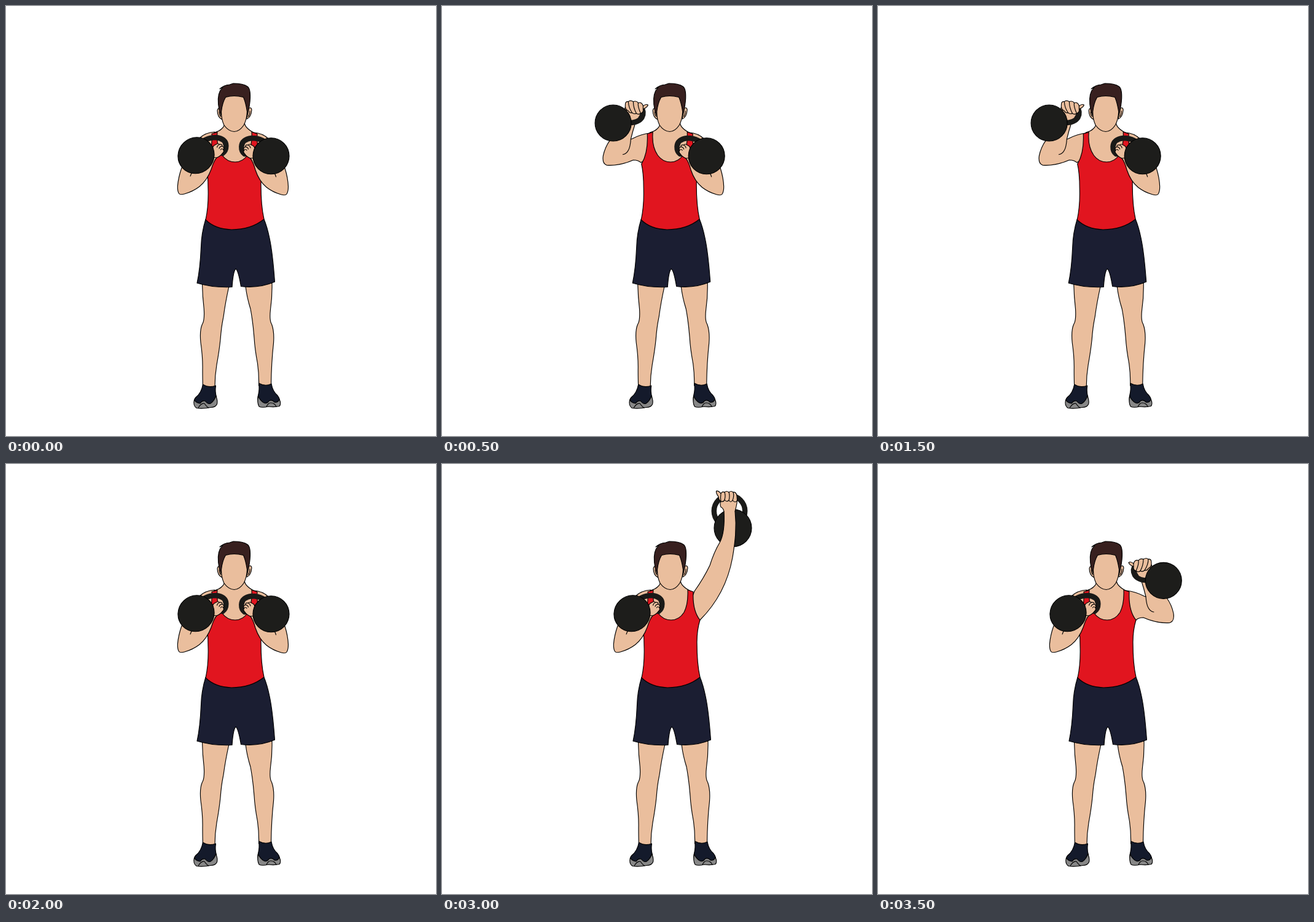
These frames come from a looping animation (700x700 px, 4 s). An HTML page:

```html
<!DOCTYPE html>
<html lang="en">
<head>
<meta charset="utf-8">
<title>Kettlebell press</title>
<style>
  html, body { margin: 0; width: 100%; height: 100%; overflow: hidden; background: #fff; }
  svg { display: block; width: 100vw; height: 100vh; }
  .skin { fill: #eabe9d; }
  .red { fill: #e1151f; }
  .navy { fill: #1b1e32; }
  .shoe { fill: #141a2b; }
  .iron { fill: #1d1d1b; }
  .hair { fill: #38201f; }
  .sole { fill: #878787; }
  .line { fill: none; }
  .ring { fill: none; stroke: #1a1a18; stroke-width: 8.5; }
</style>
</head>
<body>
<svg viewBox="0 0 700 700" stroke="#000" stroke-width="1.15" stroke-linejoin="round" stroke-linecap="round">
  <defs>
    <!-- Arms are drawn for the right side of the picture and mirrored for the other. -->
    <g id="rack-back">
      <path class="skin" d="M403 206Q418 207 427 216L430 250H404Z"/>
    </g>

    <g id="rack-front">
      <path class="skin" d="M454 264Q459 280 459.500 294Q459.500 302 457 306Q455 309 448 307Q434 303 424 295Q412 285 406 267Q402 252 397 247L390 240L399 228L412 232L425 225Z"/>
      <path class="line" d="M437 271L439.500 278"/>
      <path class="ring" d="M418 219Q410 215 400 215Q384 217 383.300 229Q383 237 388.500 241"/>
      <path class="skin" d="M398 248Q391 245 389 241Q385.500 238 387.500 235Q385.500 231 389.500 229.500Q390 225 394 226.500Q397 223.500 400 226.500Q404 227.500 405 232L406 247Z"/>
      <path class="line" d="M387.500 235Q390 232 392 235M389.500 229.500Q393 229 394.500 233M394 226.500Q397 227 398 231"/>
      <circle class="iron" cx="431.500" cy="244.200" r="29.500"/>
    </g>

    <g id="mid">
      <path class="skin" d="M404 206Q420 208 433 215Q435 216 436 216Q433 203 429 191L420 175L443 160L470 218Q478 229 481 243Q483 256 475 258.500Q455 260 432 250Q424 250 420 254L406 248Z"/>
      <path class="line" d="M436 216Q437 229 440 234Q443 240 449 241"/>
      <path class="ring" d="M420 163Q413 172 418 181Q424 190 441 189.500"/>
      <path class="skin" d="M420 174Q415 173 416 167Q410 165 408 160.500Q411 158 416 162Q418 155 424 157Q427 153 432 155Q437 152 440 155Q445 154 445 160Q446 168 440 170Q438 174 434 173Q431 176 427 174Q424 177 420 174Z"/>
      <path class="line" d="M424 157Q425 163 420 174M432 155Q432 165 427 174M440 155Q440 164 434 173M416 162L416 167"/>
      <circle class="iron" cx="464.800" cy="189.800" r="29.500"/>
    </g>

    <g id="up">
      <circle class="ring" cx="468" cy="76.500" r="25.200"/>
      <circle class="iron" cx="473.500" cy="104.200" r="30.500"/>
      <path class="skin" d="M404 225L411 207Q426 186 436 165Q443 143 452 128Q461 112 459 76L456 66H477V76C480 105 477 128 473 152C467 185 452 222 420 254L406 250Z"/>
      <path class="skin" d="M459 77Q458 72 454 70Q452 66 454 61Q450 58 450 53Q446 48 446.500 44Q450 43 454 48Q456 44 460 46Q463 43 467 46Q471 43 474 46Q479 45 480 52Q481 58 480 64Q479 70 477 77"/>
      <path class="line" d="M454 48Q453 55 454 61Q459 62 460 58Q463 63 467 59Q470 64 473 59Q477 64 480 60M460 46Q462 52 460 58M467 46Q469 52 467 59M474 46Q476 52 473 59"/>
    </g>

    <g id="body">
      <path class="skin" d="M319.500 453Q320 474 322.300 493Q323.500 512 319.500 518Q315 528 317 548Q320.500 572 320 592Q320 608 320.500 620H340Q340 602 343 584Q347 562 349 543Q350.500 522 354 506Q357 483 363 456Z"/>
      <path class="skin" d="M433 451Q433.500 474 430.500 494Q428.500 512 432.500 518Q437 530 435.500 549Q432 580 431.500 618H411.500Q412 600 409.500 582Q405 558 404 540Q402 514 398 493Q392 474 390 456Z"/>

      <path class="shoe" d="M320.500 616Q330 622 341.500 618Q340 628 342.500 636L343 648H309Q304 642 309 637Q318 630 320.500 616Z"/>
      <path class="sole" d="M306.500 641Q309 646 316 647Q319 642 324 643Q329 649 333 647Q339 643 341.500 635Q345 642 343.500 648Q341 653.500 333 653.500Q320 656 310 654.500Q304 650 306.500 641Z"/>
      <path class="line" d="M313 654Q318 646 323 647Q327 653 330 654"/>
      <path class="shoe" d="M411.500 614Q422 620 432 615Q434 627 442 634Q447 640 445 647H411Q409 640 410.500 634Q413 624 411.500 614Z"/>
      <path class="sole" d="M410.500 635Q414 643 420 646Q425 648 428 643Q433 640 437 645Q443 646 445 640Q448.500 648 445 651.500Q437 653.500 427 652Q417 654.500 412 652Q408.500 646 410.500 635Z"/>
      <path class="line" d="M424 652Q427 646 431 646Q437 646 440 652"/>

      <path class="navy" d="M325 347Q318 370 317.500 393Q316 428 311 451Q337 459 368 457.500Q370 431 374 428Q378 430 382.500 456.500Q412 460 437.500 449Q434 401 429 378Q425 359 420 347Z"/>

      <path class="skin" d="M356 183Q357 196 351 200Q347 204 339 206L340 256H404L405 207Q397 203 393 199Q387 194 388 183Z"/>
      <path class="red" d="M335 208L344 205.500Q342 229 352 243Q360 254 373 254Q386 254 394 241.500Q401 228 400 205L409 208C408 228 412 244 420 254Q415 270 415 290Q415 325 420 347Q399 364 367 364Q340 363 325 348Q330 325 329 296Q329 272 325.500 257C333 245 336 228 335 208Z"/>

      <path class="skin" d="M351 168Q345 164 344 170Q344 181 352 185Z"/>
      <path class="skin" d="M393 168Q399 163 400 169Q399 181 392 184Z"/>
      <path class="line" d="M347 172Q347 178 350 180M397 171Q397 177 394 180"/>
      <path class="hair" d="M350 178L347 169Q343 149 348.500 138L353 132.500L348 135Q354 129 364 128L370 126Q386 126 393 131Q398 134 397.500 150Q397 162 393 178Z"/>
      <path class="skin" d="M350.500 172Q352 158 357.500 148.500Q371 144.500 386.500 148.500Q390.500 158 392.500 172Q392 185 387 194Q380 204.500 371.500 204.500Q362 204 355 194Q350.500 185 350.500 172Z"/>
    </g>
  </defs>

  <rect width="700" height="700" fill="#fff" stroke="none"/>
  <g id="figure">
    <use id="left-back"/>
    <use id="right-back"/>
    <use href="#body"/>
    <use id="left-front"/>
    <use id="right-front"/>
  </g>
</svg>
<script>
  const STEP = 500;
  // Left arm, right arm, horizontal sway of the whole figure.
  const poses = [
    ["rack", "rack", 0],
    ["mid", "rack", -0.8],
    ["up", "rack", -0.8],
    ["mid", "rack", -0.8],
    ["rack", "rack", 0],
    ["rack", "mid", 0],
    ["rack", "up", 0],
    ["rack", "mid", 0]
  ];
  // Mirrored x offset, y offset and lean in degrees for the left arm.
  const mirrors = { rack: [751.2, -1, 2.4], mid: [744.2, 0.7, 0], up: [744, 1.5, 0] };
  const byId = id => document.getElementById(id);

  function setArm(side, name) {
    const back = byId(side + "-back"), front = byId(side + "-front");
    const racked = name === "rack";
    back.setAttribute("href", racked ? "#rack-back" : "#" + name);
    front.setAttribute("href", "#rack-front");
    front.style.display = racked ? "" : "none";
    if (side === "left") {
      const [x, y, lean] = mirrors[name];
      for (const part of [back, front]) {
        part.setAttribute("transform", `translate(${x} ${y}) scale(-1 1) skewX(${lean})`);
      }
    }
  }

  let shown = -1;
  function draw(now) {
    const step = Math.floor(now / STEP) % poses.length;
    if (step === shown) return;
    shown = step;
    const [left, right, sway] = poses[step];
    setArm("left", left);
    setArm("right", right);
    byId("figure").setAttribute("transform", `translate(${sway} 0)`);
  }

  function tick() {
    draw(performance.now());
    requestAnimationFrame(tick);
  }
  draw(0);
  requestAnimationFrame(tick);
</script>
</body>
</html>
```
